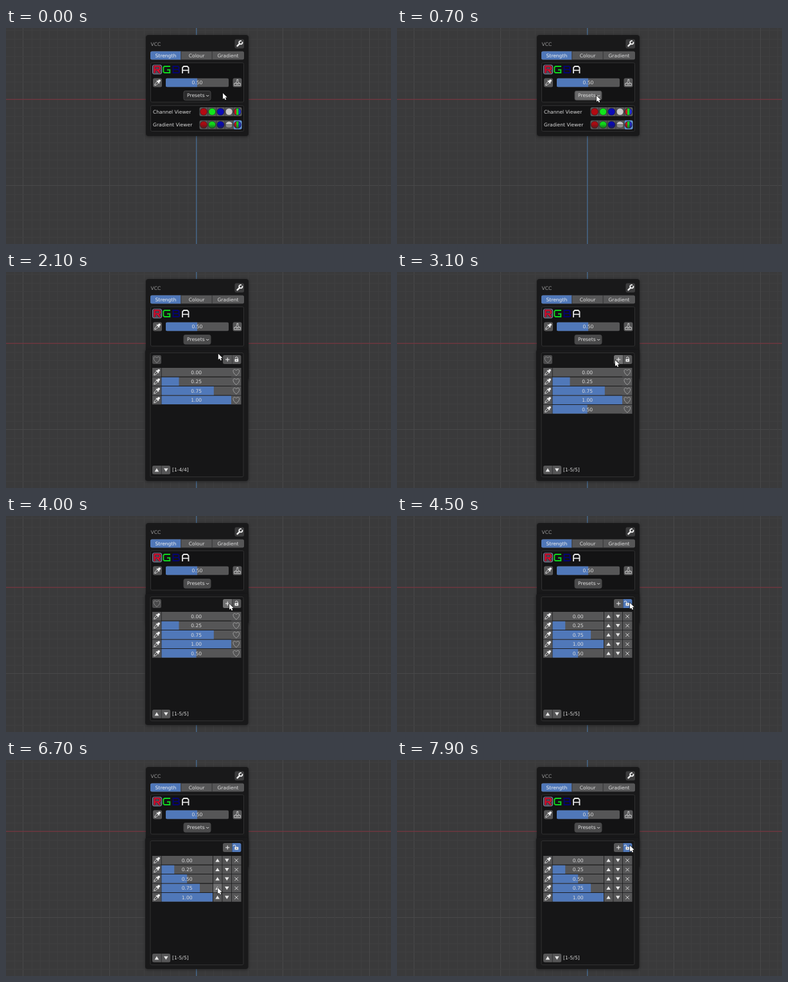
Recreate the animation shown at these times as an HTML page with a canvas. Size 600 by 338 pixels, loop 8000 ms.

```html
<!DOCTYPE html>
<html lang="en">
<head>
<meta charset="utf-8">
<title>Strength presets</title>
<style>
html, body { margin: 0; width: 100%; height: 100%; overflow: hidden; background: #3a3a3b; }
canvas { display: block; width: 600px; height: 338px; }
</style>
</head>
<body>
<canvas id="stage"></canvas>
<script>
const W = 600, H = 338, LOOP = 8000, STEP = 100;
const BLUE = '#5078b9', GREY = '#565657', HOVER = '#707071', INK = '#dcdcdc';
const canvas = document.getElementById('stage');
const ctx = canvas.getContext('2d');
const ratio = window.devicePixelRatio || 1;
canvas.width = W * ratio;
canvas.height = H * ratio;

// [start, end, x, y]: the pointer travels to x, y between start and end
const moves = [
  [0, 0, 338, 102],
  [200, 300, 337.5, 102.5],
  [400, 700, 311, 106],
  [1600, 2400, 340, 138],
  [3800, 4300, 363, 136],
  [4800, 5300, 325, 217],
  [5800, 6300, 330, 200],
  [7300, 7800, 363, 134]
];

function pointer(t) {
  let [, , x, y] = moves[0];
  for (const [a, b, nx, ny] of moves.slice(1)) {
    if (t <= a) break;
    const k = Math.min(1, (t - a) / (b - a));
    const e = k * k * (3 - 2 * k);
    x += (nx - x) * e;
    y += (ny - y) * e;
  }
  return { x, y };
}

function box(x, y, w, h, fill, r = 0, line) {
  ctx.beginPath();
  ctx.roundRect(x, y, w, h, r);
  if (fill) { ctx.fillStyle = fill; ctx.fill(); }
  if (line) { ctx.strokeStyle = line; ctx.lineWidth = 1; ctx.stroke(); }
}

function path(points, color, width = 1, close = false, filled = false) {
  ctx.beginPath();
  points.forEach(([x, y]) => ctx.lineTo(x, y));
  if (close) ctx.closePath();
  if (filled) { ctx.fillStyle = color; ctx.fill(); return; }
  ctx.strokeStyle = color;
  ctx.lineWidth = width;
  ctx.stroke();
}

function text(s, x, y, align = 'left', color = INK) {
  ctx.font = '7.6px "DejaVu Sans", sans-serif';
  ctx.textAlign = align;
  ctx.fillStyle = color;
  ctx.fillText(s, x, y);
}

function at(x, y, draw) {
  ctx.save();
  ctx.translate(x, y);
  draw();
  ctx.restore();
}

const triangle = (x, y, dir) =>
  path([[x - 3.3, y + 2.6 * dir], [x + 3.3, y + 2.6 * dir], [x, y - 2.8 * dir]], '#e8e8e8', 1, true, true);

function dropper(x, y) {
  at(x, y, () => {
    ctx.rotate(Math.PI / 4);
    box(-1.8, -6.2, 3.6, 4.8, '#eee', 1.6);
    box(-3, -2.2, 6, 1.5, '#eee', .5);
    path([[-1.4, -.7], [-1.4, 3.8], [0, 6], [1.4, 3.8], [1.4, -.7]], '#ddd', .9);
  });
}

function heart(x, y, color = '#a5a5a5') {
  at(x, y, () => {
    ctx.beginPath();
    ctx.moveTo(0, 5);
    ctx.bezierCurveTo(-8, -1, -4.5, -7.5, 0, -3);
    ctx.bezierCurveTo(4.5, -7.5, 8, -1, 0, 5);
    ctx.strokeStyle = color;
    ctx.lineWidth = .9;
    ctx.stroke();
  });
}

function wrench(x, y) {
  at(x, y, () => {
    ctx.rotate(Math.PI / 4);
    ctx.lineCap = 'round';
    path([[0, 0], [0, 5]], '#eee', 2.4);
    ctx.beginPath();
    ctx.arc(0, -2.6, 2.6, -.9, Math.PI + .9);
    ctx.strokeStyle = '#eee';
    ctx.lineWidth = 1.9;
    ctx.stroke();
  });
}

function padlock(x, y, open) {
  box(x - 2.9, y - .4, 5.8, 4.3, '#e6e6e6', .6);
  box(x - .5, y + .8, 1, 1.7, '#555');
  ctx.beginPath();
  ctx.arc(x - (open ? 3.4 : 0), y - 1.6, 1.9, Math.PI, 0);
  ctx.lineTo(x - (open ? 1.5 : -1.9), y);
  ctx.strokeStyle = '#e6e6e6';
  ctx.lineWidth = 1;
  ctx.stroke();
}

function fillTool(x, y) {
  path([[x - 4.8, y + 4.6], [x - 4.8, y + 1], [x + 4.8, y + 1], [x + 4.8, y + 4.6]], '#ccc', .9, true);
  path([[x - 2.6, y + 1], [x - 1, y - 2], [x - .6, y - 5], [x + 1.2, y - 5], [x + 1, y - 2], [x + 3, y + 1]], '#ccc', .9);
  path([[x - 1.5, y + 4], [x - 1.5, y + 2.5], [x + 1.5, y + 2.5], [x + 1.5, y + 4]], '#ccc', .7);
}

function slider(x, y, w, h, value, r = 0) {
  ctx.save();
  ctx.beginPath();
  ctx.roundRect(x, y, w, h, r);
  ctx.clip();
  box(x, y, w, h, GREY);
  box(x, y, w * value, h, BLUE);
  ctx.restore();
  text(value.toFixed(2), x + w / 2, y + h / 2 + 2.8, 'center');
}

function backdrop() {
  box(0, 0, W, H, '#3a3a3b');
  const gap = 13.5, cx = 297, cy = 112;
  for (let i = -22; i <= 22; i++) {
    const c = i % 10 ? '#3f3f40' : '#484849';
    const x = Math.round(cx + i * gap) - .5, y = Math.round(cy + i * gap) - .5;
    path([[x, 0], [x, H]], c);
    path([[0, y], [W, y]], c);
  }
  path([[0, 111.7], [W, 111.7]], '#81303f', 1.1);
  path([[296.8, 0], [296.8, H]], '#47729f', 1.1);
}

function panel(x, y, w, h) {
  ctx.save();
  ctx.shadowColor = 'rgba(0,0,0,.45)';
  ctx.shadowBlur = 4 * ratio;
  ctx.shadowOffsetY = ratio;
  box(x, y, w, h, '#19191a', 4);
  ctx.restore();
}

function letters() {
  box(228.5, 58, 14, 14, '#50505a', 2, '#7d86a0');
  const R = [[231.5, 70.5], [231.5, 60], [238.5, 60], [240, 61.5], [240, 64], [238.5, 65.5], [232, 65.5], [236, 65.5], [240, 70.5]];
  path(R, '#5a1030', 3.2);
  path(R, '#e5132d', 1.7);
  path([[256, 60], [247, 60], [245.3, 61.5], [245.3, 68.5], [247, 70], [255.3, 70], [255.3, 65.5], [251, 65.5]], '#10d420', 1.9);
  path([[260.5, 60], [268, 60], [269.5, 61.5], [269.5, 63.5], [268, 65], [270, 66.5], [270, 69], [268.5, 70], [260.5, 70]], '#05056e', 1.9, true);
  path([[261, 65], [268, 65]], '#05056e', 1.9);
  path([[275, 71], [275, 62], [277, 60], [282.5, 60], [284.5, 62], [284.5, 71]], '#e6e6e6', 1.8);
  path([[275, 66.3], [284.5, 66.3]], '#e6e6e6', 1.6);
}

function viewer(label, y, shaded) {
  text(label, 229, y + 9.7);
  box(301.5, y, 66, 14, GREY, 2.5);
  if (shaded) box(354.3, y, 13.2, 14, '#5f8fd0', 2);
  const tones = ['#b30a12', '#12e61c', '#0a0ab8', '#c9c9c9', '#101018'];
  tones.forEach((tone, i) => {
    const x = 308 + i * 13.2, cy = y + 7;
    if (i) path([[x - 6.6, y], [x - 6.6, y + 14]], '#2e2e2e', .6);
    ctx.save();
    ctx.beginPath();
    ctx.arc(x, cy, 5.5, 0, 7);
    ctx.clip();
    box(x - 6, cy - 6, 12, 12, tone);
    if (i === 4) {
      ['#d01822', '#16dc22', '#2430e0'].forEach((c, k) => box(x - 5.5 + k * 3.7, cy - 6, 3.6, 12, c));
    }
    if (shaded) {
      const g = ctx.createLinearGradient(0, cy - 6, 0, cy + 6);
      g.addColorStop(0, 'rgba(20,20,20,0)');
      g.addColorStop(.45, 'rgba(20,20,20,.1)');
      g.addColorStop(1, 'rgba(50,50,50,.75)');
      box(x - 6, cy - 6, 12, 12, g);
      if (i === 3) path([[x - 6, cy], [x + 6, cy]], '#555', 1);
    }
    ctx.restore();
    ctx.beginPath();
    ctx.arc(x, cy, 5.5, 0, 7);
    ctx.strokeStyle = 'rgba(20,20,20,.6)';
    ctx.lineWidth = .8;
    ctx.stroke();
  });
}

function header(presetFill) {
  text('VCC', 225.5, 27.6, 'left', '#9b9b9b');
  box(356.5, 17.5, 14.5, 14.5, '#3c3c3d', 2.5);
  wrench(364, 24.6);

  box(225, 36.5, 146, 13, GREY, 2.5);
  box(225, 36.5, 47.5, 13, BLUE, [2.5, 0, 0, 2.5]);
  for (const x of [272.8, 321.2]) path([[x, 36.5], [x, 49.5]], '#2c2c2d', .8);
  text('Strength', 248.8, 45.6, 'center', '#f0f0f0');
  text('Colour', 297, 45.6, 'center');
  text('Gradient', 346, 45.6, 'center');

  box(225.5, 54.5, 145, 61.5, '#131314', 2, '#303031');
  letters();
  box(229, 78.5, 14, 14, GREY, 2.5);
  dropper(236, 85.5);
  slider(249, 78.5, 98, 14, .5, 2.5);
  box(353.5, 78.5, 14, 14, GREY, 2.5);
  fillTool(360.5, 85.5);
  box(277, 98.5, 42, 14.5, presetFill, 2.5, '#464647');
  text('Presets', 282, 108.4);
  path([[312.2, 105], [314.2, 107], [316.2, 105]], '#d8d8d8', 1);
}

function row(value, i, s) {
  const y = 150 + i * 14.5, h = 13.8;
  box(228, y, 13.8, h, GREY);
  dropper(235, y + 7);
  slider(242.3, y, s.unlocked ? 79.7 : 108.7, h, value);
  if (!s.unlocked) {
    box(351, y, 15.5, h, GREY);
    heart(358.8, y + 7);
    return;
  }
  const up = s.pressed === i ? BLUE : s.over === i ? HOVER : GREY;
  box(322.8, y, 13.8, h, up);
  box(337.3, y, 13.8, h, GREY);
  box(351.8, y, 14.7, h, GREY);
  triangle(329.6, y + 7, 1);
  triangle(344.3, y + 7, -1);
  path([[356.4, y + 4.4], [361.8, y + 9.8]], '#ddd', .9);
  path([[361.8, y + 4.4], [356.4, y + 9.8]], '#ddd', .9);
}

function presets(s) {
  panel(217, 121.5, 160.5, 205.5);
  box(225, 126.5, 145, 194, '#161617', 2, '#303031');
  if (!s.unlocked) {
    box(228, 130, 14, 14, '#4a4a4b', 2.5);
    heart(235, 137.2, '#8f8f8f');
  }
  box(338, 130, 14, 14, s.plus, [2.5, 0, 0, 2.5]);
  path([[342, 137], [348.4, 137]], '#eee', 1);
  path([[345.2, 133.8], [345.2, 140.2]], '#eee', 1);
  box(352.4, 130, 14, 14, s.unlocked ? BLUE : s.lock, [0, 2.5, 2.5, 0]);
  padlock(359.3, 136.5, s.unlocked);

  s.values.forEach((v, i) => row(v, i, s));

  box(228, 303, 13.8, 13.5, GREY, [2.5, 0, 0, 2.5]);
  box(242.4, 303, 13.8, 13.5, GREY, [0, 2.5, 2.5, 0]);
  triangle(234.9, 309.8, 1);
  triangle(249.3, 309.8, -1);
  const n = s.values.length;
  text(`[1-${n}/${n}]`, 259, 312.4);
}

function arrow({ x, y }) {
  const shape = [[0, 0], [0, 9.2], [2.1, 7.4], [3.6, 10.6], [5.2, 9.9], [3.8, 6.8], [6.6, 6.6]]
    .map(([a, b]) => [x + a, y + b]);
  path(shape, '#141414', 1.2, true);
  path(shape, '#fff', 1, true, true);
}

function values(t) {
  if (t < 3000) return [0, .25, .75, 1];
  if (t < 5700) return [0, .25, .75, 1, .5];
  if (t < 6500) return [0, .25, .75, .5, 1];
  return [0, .25, .5, .75, 1];
}

function draw(t) {
  const p = pointer(t);
  const inside = (x, y, w, h) => p.x >= x && p.x < x + w && p.y >= y && p.y < y + h;
  const open = t >= 800;
  const over = inside(322, 150, 15, 72.5) ? Math.floor((p.y - 150) / 14.5) : -1;
  const state = {
    values: values(t),
    unlocked: t >= 4400,
    plus: t === 2900 ? BLUE : inside(338, 130, 14, 14) ? HOVER : GREY,
    lock: inside(352, 130, 15, 14) ? HOVER : GREY,
    over,
    pressed: t === 5600 || t === 6400 ? over : -1
  };

  ctx.setTransform(ratio, 0, 0, ratio, 0, 0);
  backdrop();
  panel(218, 11, 160, 158);
  header(inside(277, 98, 42, 15) ? '#676768' : open ? '#4a4a4b' : '#2b2b2c');
  if (open) {
    presets(state);
  } else {
    box(225.5, 121.5, 145, 40, '#131314', 2, '#303031');
    viewer('Channel Viewer', 124, false);
    viewer('Gradient Viewer', 144.5, true);
  }
  arrow(p);
}

const start = performance.now();
function tick() {
  const t = (performance.now() - start) % LOOP;
  draw(Math.floor(t / STEP) * STEP);
  requestAnimationFrame(tick);
}
tick();
</script>
</body>
</html>
```
